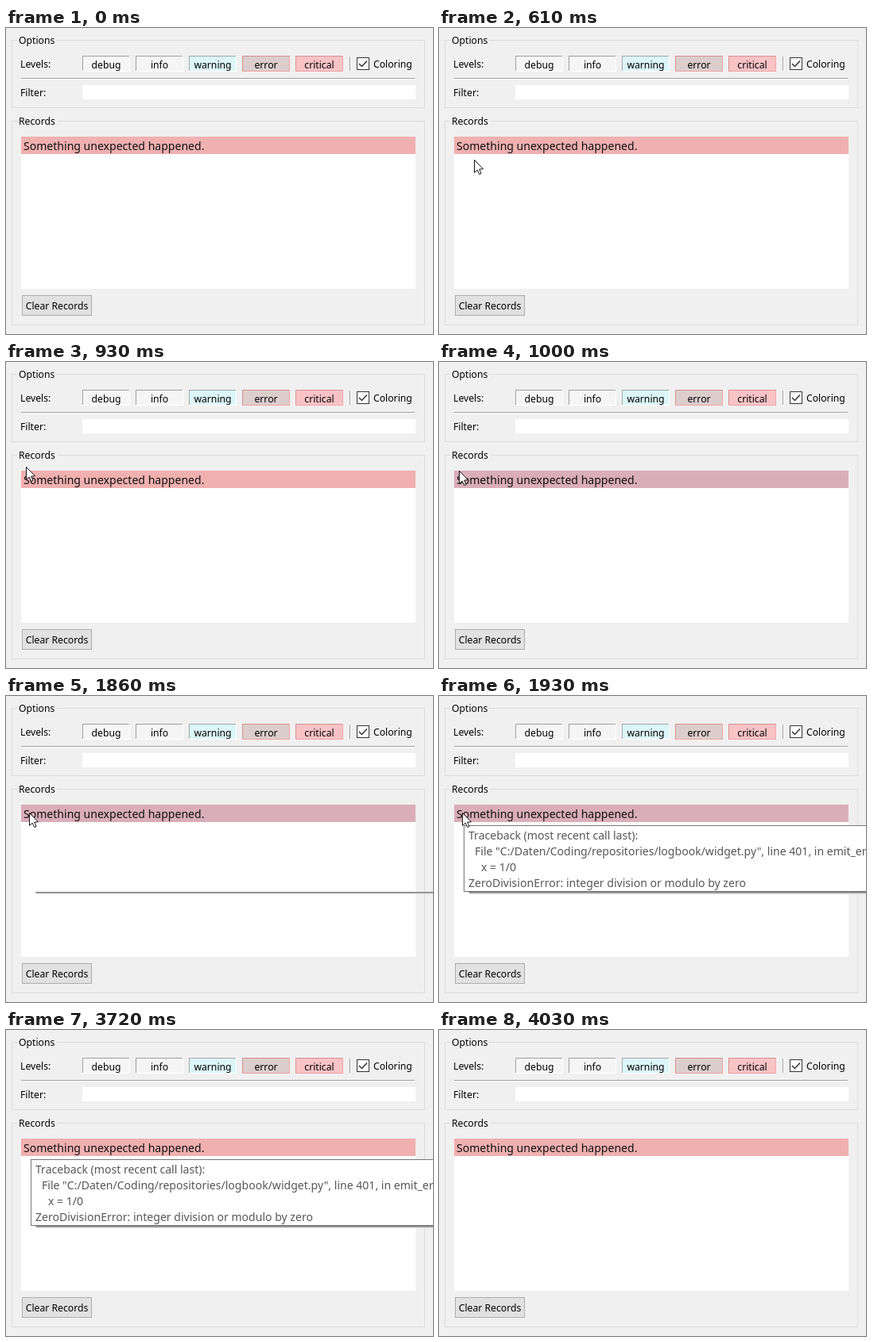
Write an HTML page with a canvas that moves like this. It is 537 px wide and 386 px high and loops after 5270 ms.

```html
<!DOCTYPE html>
<html lang="en">
<head>
<meta charset="utf-8">
<title>Log records</title>
<style>
html, body { margin: 0; width: 100%; height: 100%; overflow: hidden; background: #f0f0f0; }
canvas { display: block; }
</style>
</head>
<body>
<canvas id="stage" width="537" height="386"></canvas>
<script>
const ctx = document.getElementById('stage').getContext('2d');
const LOOP = 5270;
const UI = '12.2px "Noto Sans", "Open Sans", sans-serif';
const BODY = '14.05px "Noto Sans", "Open Sans", sans-serif';

// Pointer positions: start time, x, y
const POINTER = [
  [530, 62, 193], [610, 44, 166], [690, 28, 124], [770, 18, 99],
  [850, 20, 97], [930, 25, 132], [1000, 25, 137], [1080, 29, 147]
];
const POINTER_END = 3720;
const SHADOW_START = 1860, TIP_START = 1930, TIP_END = 4030;
const TRACE = [
  [37, 'Traceback (most recent call last):'],
  [45, 'File "C:/Daten/Coding/repositories/logbook/widget.py", line 401, in emit_error'],
  [53, 'x = 1/0'],
  [37, 'ZeroDivisionError: integer division or modulo by zero']
];

function rect(x, y, w, h, fill) {
  ctx.fillStyle = fill;
  ctx.fillRect(x, y, w, h);
}

function frame(x, y, w, h, color) {
  ctx.strokeStyle = color;
  ctx.lineWidth = 1;
  ctx.strokeRect(x + 0.5, y + 0.5, w - 1, h - 1);
}

function text(str, x, y, font = UI, color = '#000', align = 'left') {
  ctx.font = font;
  ctx.fillStyle = color;
  ctx.textAlign = align;
  ctx.fillText(str, x, y);
}

function path(points) {
  ctx.beginPath();
  points.forEach(([x, y]) => ctx.lineTo(x, y));
}

function checker(a, b) {
  const tile = document.createElement('canvas');
  tile.width = tile.height = 2;
  const t = tile.getContext('2d');
  t.fillStyle = a;
  t.fillRect(0, 0, 2, 2);
  t.fillStyle = b;
  t.fillRect(0, 0, 1, 1);
  t.fillRect(1, 1, 1, 1);
  return ctx.createPattern(tile, 'repeat');
}

const LEVELS = [
  ['debug', '#f5f5f5', '#a0a0a0', '#ffffff'],
  ['info', '#f5f5f5', '#a0a0a0', '#ffffff'],
  ['warning', '#dcf5f8', '#a0a8aa', '#ffffff'],
  ['error', checker('#eec4c4', '#c9d7d4'), '#d98f90', '#f0a5a5'],
  ['critical', checker('#ffd3d6', '#f2b3b6'), '#d98f90', '#f0a5a5']
];

function group(title, y, h, gapEnd) {
  frame(7, y, 520, h, '#dcdcdc');
  rect(14, y, gapEnd - 14, 1, '#f0f0f0');
  text(title, 16, y + 5);
}

function levelButton([label, fill, dark, light], i) {
  const x = 96 + i * 67;
  rect(x, 35, 60, 20, light);
  rect(x, 35, 59, 19, dark);
  rect(x + 1, 36, 58, 18, fill);
  text(label, x + 30, 51, UI, '#000', 'center');
}

function panel() {
  rect(0, 0, 537, 386, '#f0f0f0');
  group('Options', 15, 86, 62);
  text('Levels:', 18, 50);
  LEVELS.forEach(levelButton);

  rect(432, 36, 1, 18, '#a0a0a0');
  rect(433, 36, 1, 18, '#fff');
  rect(441, 37, 16, 16, '#fff');
  frame(441, 37, 16, 16, '#333');
  path([[444, 45], [447.5, 48.5], [454, 41.5]]);
  ctx.strokeStyle = '#333';
  ctx.lineWidth = 1.5;
  ctx.stroke();
  text('Coloring', 462, 50);

  rect(19, 63, 495, 1, '#a0a0a0');
  rect(19, 64, 495, 1, '#fff');
  text('Filter:', 18, 86);
  rect(96, 72, 419, 18, '#fff');

  group('Records', 117, 258, 65);
  rect(19, 137, 496, 192, '#fff');
  rect(20, 337, 88, 26, '#e1e1e1');
  frame(20, 337, 88, 26, '#adadad');
  text('Clear Records', 64, 355, UI, '#000', 'center');
}

function record(hover) {
  rect(19, 137, 496, 22, hover ? '#daadba' : '#f0b0b0');
  text('Something unexpected happened.', 22, 154, BODY, '#111');
}

function tipShadow() {
  ['#858585', '#a9a9a9', '#dedede'].forEach((c, i) => rect(37 + i, 247 + i, 500, 1, c));
}

function tooltip() {
  rect(31, 163, 520, 84, '#fff');
  frame(31, 163, 520, 84, '#767676');
  TRACE.forEach(([x, line], i) => text(line, x, 181 + i * 20, BODY, '#575757'));
}

function pointer(x, y) {
  ctx.save();
  ctx.translate(x + 0.5, y + 0.5);
  path([[0, 0], [0, 16], [3.7, 12.7], [6.2, 18], [8.6, 17], [6.2, 11.7], [11, 11.3]]);
  ctx.closePath();
  ctx.fillStyle = '#fff';
  ctx.fill();
  ctx.strokeStyle = '#111';
  ctx.lineWidth = 1;
  ctx.stroke();
  ctx.restore();
}

function draw(t) {
  const pose = t < POINTER_END ? POINTER.filter(p => p[0] <= t).pop() : null;
  const hover = pose && pose[2] >= 137 && pose[2] < 159;
  panel();
  record(hover);
  if (t >= SHADOW_START && t < TIP_END) tipShadow();
  if (t >= TIP_START && t < TIP_END) tooltip();
  if (pose) pointer(pose[1], pose[2]);
}

const start = performance.now();
function tick() {
  draw((performance.now() - start) % LOOP);
  requestAnimationFrame(tick);
}
tick();
</script>
</body>
</html>
```
